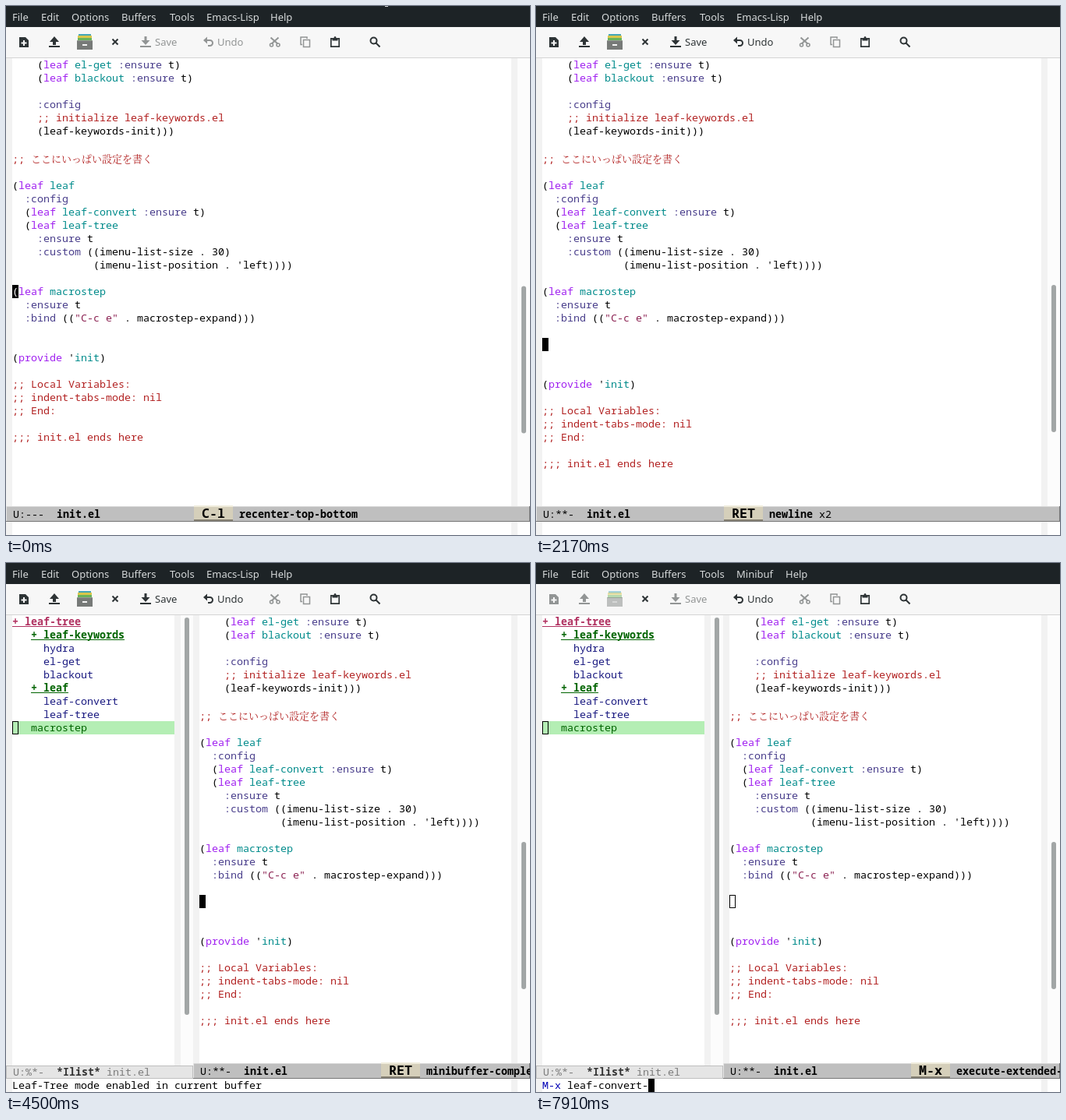
Animation, 672 px wide and 679 px high, one loop 8 s. Source, as an HTML page with a canvas:

```html
<!DOCTYPE html>
<html lang="en">
<head>
<meta charset="utf-8">
<title>Editor session</title>
<style>
html, body { margin: 0; width: 100%; height: 100%; overflow: hidden; background: #fff; }
canvas { display: block; width: 672px; height: 679px; }
</style>
</head>
<body>
<canvas id="stage" width="672" height="679"></canvas>
<script>
const ctx = document.getElementById('stage').getContext('2d');
const LOOP = 8000, CELL = 8, ROW = 17;
const MONO = '13.333px "Noto Sans Mono", monospace';
const BOLD = 'bold ' + MONO;
const KEY = 'bold 16.667px "Noto Sans Mono", monospace';
const UI = '13px "Noto Sans", sans-serif';
const CJK = '13px "Noto Serif CJK JP", "Noto Sans CJK JP", serif';
const INK = '#2e3436', FADED = '#929595', FRINGE = '#f2f2f2';

const CODE = `    (leaf el-get :ensure t)
    (leaf blackout :ensure t)

    :config
    ;; initialize leaf-keywords.el
    (leaf-keywords-init)))

;; ここにいっぱい設定を書く

(leaf leaf
  :config
  (leaf leaf-convert :ensure t)
  (leaf leaf-tree
    :ensure t
    :custom ((imenu-list-size . 30)
             (imenu-list-position . 'left))))

(leaf macrostep
  :ensure t
  :bind (("C-c e" . macrostep-expand)))


(provide 'init)

;; Local Variables:
;; indent-tabs-mode: nil
;; End:

;;; init.el ends here`.split('\n');
const CJK_ROW = 7, INSERT_ROW = 20;

const TOKENS = /(;;.*)|("[^"]*")|((?<=\()(?:leaf|provide)(?= ))|((?<=\(leaf )[\w-]+|(?<=provide ')\w+)|(:[a-z]+)/g;
const TOKEN_COLORS = ['#b22222', '#8b2252', '#a020f0', '#008b8b', '#483d8b'];

const TREE = [
  [0, '+ leaf-tree', '#b03060'], [3, '+ leaf-keywords', '#006400'],
  [5, 'hydra'], [5, 'el-get'], [5, 'blackout'],
  [3, '+ leaf', '#006400'],
  [5, 'leaf-convert'], [5, 'leaf-tree'], [3, 'macrostep']
];

const START = {
  row: 17, col: 0, added: 0, key: 'C-l', command: 'recenter-top-bottom', count: '',
  menu: 'Emacs-Lisp', files: true, save: false, undo: false,
  prompt: false, typed: '', tree: false, echo: '', speck: true
};
const typing = steps => steps.map(([time, typed]) => [time, { typed }]);
const openPrompt = { prompt: true, typed: '', echo: '', files: false, save: false,
  key: 'M-x', command: 'execute-extended-command', count: '' };

const EVENTS = [
  [430, { speck: false }],
  [1400, { key: 'C-e', command: 'move-end-of-line', col: 15 }],
  [1470, { count: 'x2' }],
  [1630, { row: 18, col: 11 }],
  [1740, { row: 19, col: 39, key: 'C-n', command: 'next-line', count: '' }],
  [1840, { count: 'x2' }],
  [2070, { row: 20, col: 0, added: 1, key: 'RET', command: 'newline', count: '' }],
  [2100, { save: true, undo: true }],
  [2170, { row: 21, added: 2, count: 'x2' }],
  [3070, { menu: 'Minibuf' }],
  [3100, openPrompt],
  ...typing([[3270, 'le'], [3330, 'leaf'.slice(0, 3)], [3390, 'leaf'], [3440, 'leaf-'],
    [3700, 'leaf-t'], [3800, 'leaf-tr'], [3940, 'leaf-tre'], [4040, 'leaf-tree'],
    [4170, 'leaf-tree-mode']]),
  [4440, { prompt: false, key: 'RET', command: 'minibuffer-complete-and-exit' }],
  [4470, { tree: true, menu: 'Emacs-Lisp' }],
  [4500, { echo: 'Leaf-Tree mode enabled in current buffer', files: true, save: true }],
  [5940, { menu: 'Minibuf' }],
  [6010, openPrompt],
  ...typing([6310, 6610, 6650, 6700, 6740, 7070, 7310, 7370, 7430, 7550, 7610, 7770, 7910]
    .map((time, i) => [time, 'leaf-convert-'.slice(0, i + 1)]))
];

const stateAt = time => Object.assign({}, START,
  ...EVENTS.filter(([at]) => at <= time).map(([, change]) => change));

function rect(x, y, w, h, color) {
  ctx.fillStyle = color;
  ctx.fillRect(x, y, w, h);
}

function text(str, x, y, color = '#000', font = MONO) {
  ctx.font = font;
  ctx.fillStyle = color;
  ctx.fillText(str, x, y);
}

function fillPath(d, color) {
  ctx.fillStyle = color;
  ctx.fill(new Path2D(d), 'evenodd');
}

function strokePath(d, color, width) {
  ctx.strokeStyle = color;
  ctx.lineWidth = width;
  ctx.stroke(new Path2D(d));
}

function thumb(x, top, bottom) {
  ctx.fillStyle = '#a2a6a6';
  ctx.beginPath();
  ctx.roundRect(x, top, 6, bottom - top, 3);
  ctx.fill();
}

const rowTop = row => 67 + row * ROW + (row > CJK_ROW ? 2 : 0);

function hollowCursor(x, y) {
  ctx.strokeStyle = '#000';
  ctx.lineWidth = 1;
  ctx.strokeRect(x + .5, y + .5, CELL - 1, ROW - 1);
}

function drawMenu(s) {
  rect(0, 0, 672, 27, '#1d2326');
  const items = [['File', 8], ['Edit', 45], ['Options', 84], ['Buffers', 148], ['Tools', 210],
    [s.menu, 257], ['Help', s.menu === 'Minibuf' ? 320 : 339]];
  for (const [label, x] of items) text(label, x, 19, '#d6d9da', UI);
  if (s.speck) rect(486, 0, 4, 1, '#d6d9da');
}

function drawCabinet(enabled) {
  ctx.globalAlpha = enabled ? 1 : .45;
  rect(93, 36, 16, 3, '#43a6b5');
  rect(92, 38, 18, 3, '#d9c64b');
  rect(92, 41, 18, 4, '#69b35a');
  rect(91, 44, 20, 12, '#777a78');
  rect(91, 44, 20, 1, '#969996');
  rect(98, 49, 6, 2, '#f4f4f4');
  ctx.globalAlpha = 1;
}

function drawToolbar(s) {
  rect(0, 27, 672, 39, '#f7f7f7');
  rect(0, 66, 672, 1, '#d5d5d5');
  const tone = on => on ? INK : FADED;
  const files = tone(s.files), save = tone(s.save), undo = tone(s.undo);

  fillPath('M17 40h8l4 4v9h-12z M22 44v2.5h-2.5v2h2.5v2.5h2v-2.5h2.5v-2h-2.5v-2.5z', files);
  fillPath('M62 39l6 7h-4v4h-4v-4h-4z M55 51h14v2h-14z', files);
  drawCabinet(s.files);
  strokePath('M136.5 42.5l7 7M143.5 42.5l-7 7', INK, 2);
  fillPath('M177.500 39h3v5h4l-5.500 6l-5.500 -6h4z M172 51h14v2h-14z', save);
  text('Save', 191, 51, save, UI);
  strokePath('M255 44h6.500a3.500 3.500 0 0 1 0 7h-2.500', undo, 2);
  fillPath('M253 44l5-4.500v9z', undo);
  text('Undo', 271, 51, undo, UI);

  strokePath('M339.5 40.500l9 8M349.500 40.500l-9 8', FADED, 2);
  strokePath('M342.500 50a2 2 0 1 1-4 0a2 2 0 1 1 4 0M351 50a2 2 0 1 1-4 0a2 2 0 1 1 4 0', FADED, 1.6);
  strokePath('M380 49.500h-2v-9.500h8v2M381.500 43.500h8v9h-8z', FADED, 1.5);
  strokePath('M416.8 41.800h10.400v10.400h-10.400z', INK, 1.7);
  fillPath('M418.500 41h2a1.500 2 0 0 1 3 0h2v3.500h-7z', INK);
  strokePath('M475.500 44.500a4 4 0 1 1-8 0a4 4 0 1 1 8 0M474.500 47.500l5 5', INK, 2);
}

function drawCodeLine(line, x, baseline) {
  let last = 0;
  const plain = (from, to) => text(line.slice(from, to), x + from * CELL, baseline);
  for (const match of line.matchAll(TOKENS)) {
    plain(last, match.index);
    const color = TOKEN_COLORS[match.slice(1).findIndex(Boolean)];
    const wide = match[0].search(/[^\x00-\x7f]/);
    const start = x + match.index * CELL;
    if (wide < 0) {
      text(match[0], start, baseline, color);
    } else {
      text(match[0].slice(0, wide), start, baseline, color);
      text(match[0].slice(wide), start + wide * CELL, baseline, color, CJK);
    }
    last = match.index + match[0].length;
  }
  plain(last);
}

function drawEditor(s, left) {
  rect(left, 67, 672 - left, 575, '#fff');
  rect(left, 67, 8, 575, FRINGE);
  rect(648, 67, 8, 575, FRINGE);
  rect(656, 67, 16, 575, '#fcfcfc');
  const shift = s.added ? 1.5 : 0;
  thumb(661, 359.5 - shift, 548.5 - shift);

  const x = left + 8;
  CODE.forEach((line, i) => {
    const row = i >= INSERT_ROW ? i + s.added : i;
    drawCodeLine(line, x, rowTop(row) + (row === CJK_ROW ? 15 : 13));
  });

  const cx = x + s.col * CELL, cy = rowTop(s.row);
  if (s.prompt) return hollowCursor(cx, cy);
  rect(cx, cy, CELL, ROW, '#000');
  if (s.row === 17 && s.col === 0) text('(', cx, cy + 13, '#fff');
}

function drawModeLine(s, left) {
  rect(left, 642, 672 - left, 20, '#bfbfbf');
  rect(left, 642, 672 - left, 1, '#d8d8d8');
  rect(left, 642, 1, 20, '#e6e6e6');
  rect(left, 661, 672 - left, 1, '#777');
  rect(671, 642, 1, 20, '#777');
  text(s.added ? 'U:**-' : 'U:---', left + 9, 657);
  text('init.el', left + 65, 657, '#000', BOLD);

  const x = left + 241;
  rect(x, 642, 50, 19, '#d5cfba');
  rect(x, 641, 50, 2, '#f0ecdc');
  rect(x, 659, 50, 2, '#858072');
  text(s.key, x + 10, 657, '#000', KEY);
  text(s.command, x + 58, 657, '#000', BOLD);
  text(s.count, x + 58 + (s.command.length + 1) * CELL, 657);
}

function drawTree() {
  rect(0, 67, 240, 578, '#fff');
  rect(0, 67, 8, 578, FRINGE);
  rect(216, 67, 8, 578, FRINGE);
  rect(224, 67, 16, 578, '#fcfcfc');
  thumb(229, 70, 580);
  rect(8, 203, 208, ROW, '#b4eeb4');
  TREE.forEach(([indent, label, heading], i) => {
    const x = 8 + indent * CELL, y = 80 + i * ROW;
    const color = heading || (label === 'macrostep' ? '#006400' : '#191980');
    text(label, x, y, color, heading ? BOLD : MONO);
    if (heading) rect(x, y + 1, label.length * CELL, 1, color);
  });
  hollowCursor(8, 203);

  rect(0, 645, 240, 17, '#e5e5e5');
  ctx.strokeStyle = '#bfbfbf';
  ctx.lineWidth = 1;
  ctx.strokeRect(.5, 645.5, 239, 16);
  text('U:%*-', 9, 658, '#7c7c7c');
  text('*Ilist*', 65, 658, '#333', BOLD);
  text('init.el', 129, 658, '#7c7c7c');
}

function drawMinibuffer(s) {
  rect(0, 662, 672, 17, '#fff');
  rect(0, 662, 8, 17, FRINGE);
  rect(648, 662, 8, 17, FRINGE);
  text(s.echo, 8, 675);
  if (!s.prompt) return;
  text('M-x', 8, 675, '#0000b4');
  text(s.typed, 40, 675);
  rect(40 + s.typed.length * CELL, 662, CELL, ROW, '#000');
}

function draw(time) {
  const s = stateAt(time);
  const left = s.tree ? 240 : 0;
  drawMenu(s);
  drawToolbar(s);
  drawEditor(s, left);
  if (s.tree) drawTree();
  drawMinibuffer(s);
  drawModeLine(s, left);
}

const begin = performance.now();
function tick() {
  draw((performance.now() - begin) % LOOP);
  requestAnimationFrame(tick);
}
tick();
</script>
</body>
</html>
```
